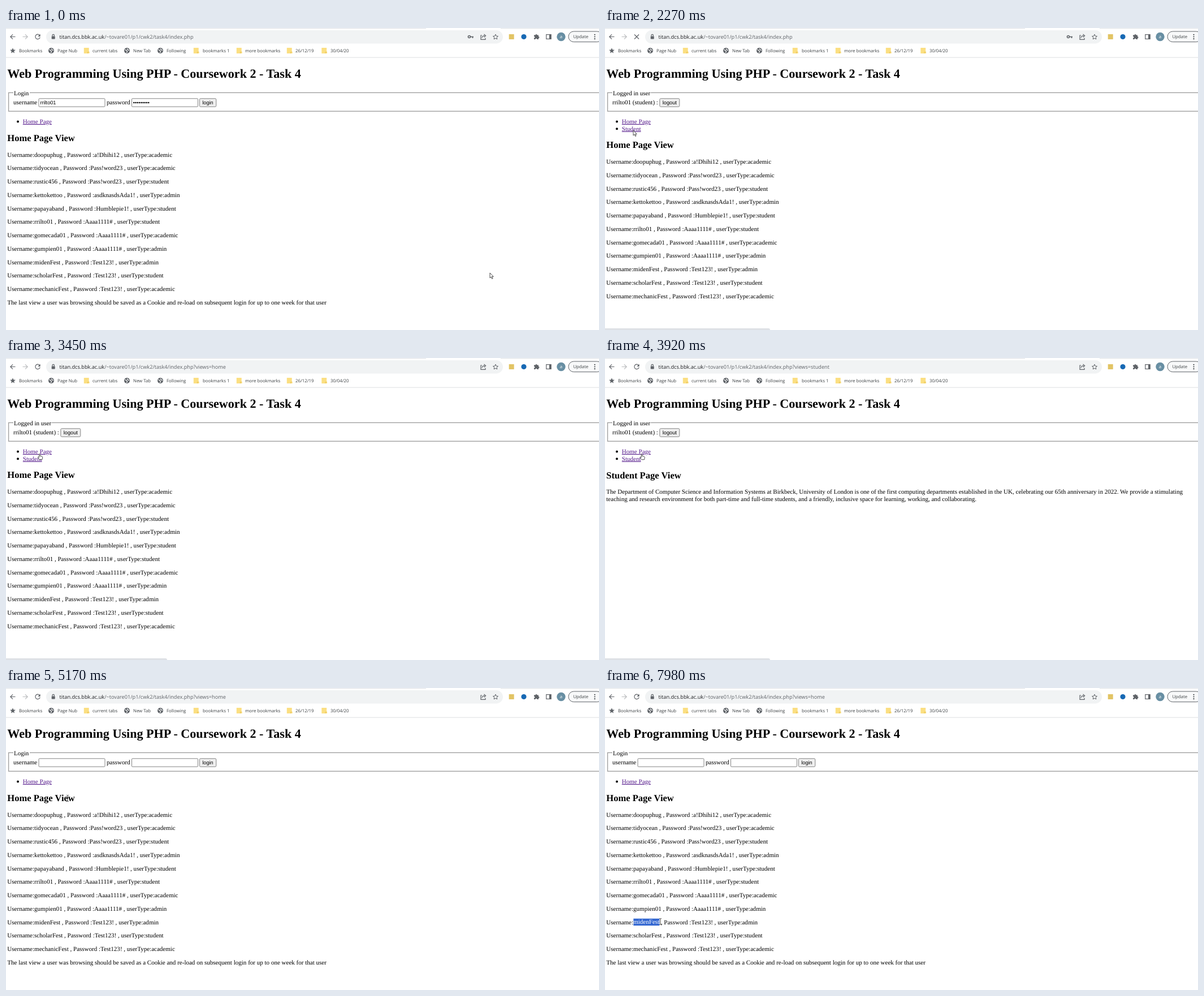
These frames come from a looping animation (1049 px wide and 534 px high, 8 s). An HTML page:

```html
<!DOCTYPE html>
<html lang="en">
<head>
<meta charset="utf-8">
<title>Login demo</title>
<style>
  html, body { margin: 0; width: 100%; height: 100%; overflow: hidden; background: #fff; }
  svg { display: block; }
  text { white-space: pre; text-rendering: geometricPrecision; }
  .page { font: 11.04px "Liberation Serif", serif; }
  .h1 { font-size: 22.1px; font-weight: bold; }
  .h2 { font-size: 16.56px; font-weight: bold; }
  .control { font: 9.2px "Liberation Sans", sans-serif; }
  .link { fill: #551a8b; text-decoration: underline; }
  .ui { font: 7.8px "Open Sans", sans-serif; fill: #3c4043; }
  .url { font-size: 9.19px; fill: #5f6368; }
  .field { fill: #fff; stroke: #767676; stroke-width: .9; }
  .button { fill: #efefef; stroke: #767676; stroke-width: .9; }
  .button.hover { fill: #e0e0e0; stroke: #4f4f4f; }
  .icon { fill: none; stroke: #5f6368; stroke-width: 1.2; }
</style>
</head>
<body>
<svg width="1049" height="534" viewBox="0 0 1049 534">
  <rect width="1049" height="534" fill="#fff"/>
  <g class="ui">
    <path d="M0 0H743V1H0ZM875 0H1049V1H875Z" fill="#dee1e6"/>
    <rect x="71" y="4" width="808" height="23.5" rx="11.7" fill="#f1f3f4"/>
    <rect y="51.6" width="1049" height="1" fill="#dcdfe2"/>
    <path class="icon" d="M16.5 15.5H8M12 11.3L7.8 15.5L12 19.7"/>
    <path class="icon" d="M29.5 15.5H38M34 11.3L38.2 15.5L34 19.7" style="stroke:#babcbe"/>
    <g id="reload">
      <path class="icon" d="M59.2 12.5A4.2 4.2 0 1 0 60.2 16.5"/>
      <path d="M60.6 10.7V15H56.3Z" fill="#5f6368"/>
    </g>
    <path id="stop" class="icon" d="M52 11.5L60 19.5M60 11.5L52 19.5"/>
    <rect x="80.7" y="14.4" width="6" height="5" rx=".6" fill="#5f6368"/>
    <path class="icon" d="M82 14.5V13A1.7 1.7 0 0 1 85.4 13V14.5" stroke-width="1"/>
    <text class="url" x="94.5" y="19.2"><tspan fill="#202124">titan.dcs.bbk.ac.uk</tspan>/~tovare01/p1/cwk2/task4/index.php<tspan id="query"></tspan></text>
    <g id="key" class="icon"><circle cx="819.5" cy="15.5" r="2" stroke-width="1.6"/><path d="M821.5 15.5H827M825.5 15.5V18" stroke-width="1.6"/></g>
    <path class="icon" d="M842 13H840V20.3H848V17.5M842 17.5Q842.5 13.7 847 13.7M845.5 11L848.7 13.7L845.5 16.4" stroke-width="1"/>
    <path class="icon" d="M866 11.2L867.3 14.2L870.5 14.5L868.1 16.7L868.8 19.8L866 18.2L863.2 19.8L863.9 16.7L861.5 14.5L864.7 14.2Z" style="stroke-width:1"/>
    <rect x="889.7" y="11" width="9" height="9" fill="#e2c465"/>
    <circle cx="916" cy="15.5" r="4.6" fill="#1769b4"/>
    <path fill="#5f6368" d="M934 12.5H936.6A1.5 1.5 0 0 1 939.6 12.5H942V15A1.5 1.5 0 0 1 942 18V20H939.5A1.5 1.5 0 0 0 936.5 20H934V17.8A1.5 1.5 0 0 0 934 14.8Z"/>
    <rect class="icon" x="955.8" y="11.6" width="8.4" height="7.8"/>
    <rect x="961" y="11.6" width="3.2" height="7.8" fill="#5f6368"/>
    <circle cx="982" cy="15.5" r="7.7" fill="#688fa3"/>
    <text x="982" y="18.2" text-anchor="middle" style="fill:#fff">a</text>
    <rect x="995" y="6" width="60" height="18.6" rx="9.3" fill="#f8f9fa" stroke="#5f6368"/>
    <text x="1003.4" y="18.2">Update</text>
    <g fill="#3c4043"><circle cx="1041.5" cy="11.8" r="1.1"/><circle cx="1041.5" cy="15.5" r="1.1"/><circle cx="1041.5" cy="19.2" r="1.1"/></g>
    <path fill="#5f6368" d="M12 35.2L13.4 38.4L16.9 38.7L14.2 41L15 44.4L12 42.6L9 44.4L9.8 41L7.1 38.7L10.6 38.4Z"/>
    <g id="bookmarks"></g>
  </g>

  <g class="page">
    <text class="h1" x="2.3" y="88">Web Programming Using PHP - Coursework 2 - Task 4</text>
    <rect x="4.6" y="114.4" width="1060" height="32.8" fill="none" stroke="#9a9a9a" stroke-width="1.3"/>
    <g id="loggedOut">
      <rect x="13" y="112" width="29" height="5" fill="#fff"/>
      <text x="14" y="118.5">Login</text>
      <text x="13" y="135.3">username</text>
      <text x="178" y="135.3">password</text>
      <rect class="field" x="58" y="124.8" width="117" height="14.4" rx="1.3"/>
      <rect class="field" x="222.5" y="124.8" width="117" height="14.4" rx="1.3"/>
      <g id="filled"><text class="control" x="60.4" y="135.2">rrilto01</text></g>
      <rect id="login" class="button" x="342.4" y="124.8" width="29.4" height="14.4" rx="1.8"/>
      <text class="control" x="357" y="135.2" text-anchor="middle">login</text>
    </g>
    <g id="loggedIn">
      <rect x="13" y="112" width="68" height="5" fill="#fff"/>
      <text x="14" y="118.5">Logged in user</text>
      <text x="13" y="135.3">rrilto01 (student) :</text>
      <rect id="logout" class="button" x="96.8" y="124.8" width="35" height="14.4" rx="1.8"/>
      <text class="control" x="114.3" y="135.2" text-anchor="middle">logout</text>
      <circle cx="21" cy="178.2" r="2"/>
      <text class="link" x="29.8" y="181.6">Student</text>
    </g>
    <circle cx="21" cy="165.5" r="2"/>
    <text class="link" x="29.8" y="168.9">Home Page</text>
    <g id="home"><text class="h2" x="2.3" y="199.8">Home Page View</text></g>
    <text id="hint" x="2.3" y="488.8">The last view a user was browsing should be saved as a Cookie and re-load on subsequent login for up to one week for that user</text>
    <g id="student">
      <text class="h2" x="2.3" y="212.5">Student Page View</text>
      <text x="2.3" y="240.3">The Department of Computer Science and Information Systems at Birkbeck, University of London is one of the first computing departments established in the UK, celebrating our 65th anniversary in 2022. We provide a stimulating</text>
      <text x="2.3" y="253">teaching and research environment for both part-time and full-time students, and a friendly, inclusive space for learning, working, and collaborating.</text>
    </g>
    <svg id="selection" x="50.2" y="407.5" width="0" height="12.7">
      <rect width="60" height="13" fill="#3367d1"/>
      <text y="9.9" fill="#fff">midenFest</text>
    </svg>
  </g>
  <path id="status" fill="#dee1e6"/>
  <g id="cursor" fill="#fff" stroke="#222" stroke-width=".8">
    <path id="arrow" d="M0 0V9L2.1 7.1L3.6 10.5L5.1 9.8L3.6 6.6H6.3Z"/>
    <path id="hand" d="M-.8 .8Q0 -.6 .9 .8V4L4.3 4.8Q5.6 5.2 5.2 7L4.5 10.3H-.2L-3 6.6Q-3 5.2 -1.9 5.6L-.8 6.5Z"/>
    <path id="beam" d="M-2 -5.5Q0 -5.5 0 -4.5Q0 -5.5 2 -5.5M0 -4.5V4.5M-2 5.5Q0 5.5 0 4.5Q0 5.5 2 5.5" fill="none"/>
  </g>
</svg>
<script>
const $ = id => document.getElementById(id);
const add = (id, markup) => $(id).insertAdjacentHTML('beforeend', markup);
const show = (id, on) => $(id).style.display = on ? '' : 'none';

const globe = x => `<circle cx="${x}" cy="40" r="5" fill="#5f6368"/>
  <path d="M${x - 3.6} 38.2L${x - .8} 39.7L${x + .6} 42L${x - 1} 44M${x + .5} 36.2L${x + 1} 38.4L${x + 3.8} 39.6" fill="none" stroke="#fff" stroke-width="1.2"/>`;
const folder = x => `<path d="M${x - 4.7} 35H${x + 4.2}V42.5H${x + 5}V45H${x - 4.7}Z" fill="#fbdf82"/>
  <path d="M${x + 2} 45V42.5H${x + 5}" fill="none" stroke="#e5bd4e" stroke-width=".8"/>`;

[['Bookmarks', 23], ['Page Nub', 91, globe, 80], ['current tabs', 153, folder, 142.5],
 ['New Tab', 225, globe, 214], ['Following', 284, globe, 273], ['bookmarks 1', 348, folder, 336.5],
 ['more bookmarks', 423, folder, 412.5], ['26/12/19', 512, folder, 501.5], ['30/04/20', 574, folder, 563]]
  .forEach(([label, x, icon, at]) =>
    add('bookmarks', `${icon ? icon(at) : ''}<text x="${x}" y="42.7">${label}</text>`));

['doopuphug a!Dhihi12 academic', 'tidyocean Pass!word23 academic', 'rustic456 Pass!word23 student',
 'kettokettoo asdknasdsAda1! admin', 'papayaband Humblepie1! student', 'rrilto01 Aaaa1111# student',
 'gomecada01 Aaaa1111# academic', 'gumpien01 Aaaa1111# admin', 'midenFest Test123! admin',
 'scholarFest Test123! student', 'mechanicFest Test123! academic']
  .forEach((row, i) => {
    const [user, password, type] = row.split(' ');
    add('home', `<text x="2.3" y="${227.5 + 23.75 * i}">Username:${user} , Password :${password} , userType:${type}</text>`);
  });

for (let i = 0; i < 9; i++) add('filled', `<circle cx="${226.3 + 3.24 * i}" cy="132" r="1.25"/>`);

const LOOP = 8000;
// Screen updates: first, last, count
const updates = [[70, 810, 11], [900, 1120, 4], [1290, 2040, 11], [2130, 2900, 11], [3130, 3920, 11],
  [4000, 4480, 7], [4620, 4620, 1], [4790, 5550, 11], [5640, 6410, 11], [6490, 7280, 11],
  [7350, 7350, 1], [7510, 7660, 3], [7980, 7980, 1]]
  .flatMap(([from, to, n]) => Array.from({length: n}, (_, i) => from + (to - from) * i / (n - 1 || 1)));

// Pointer path: time, x, y, shape
const path = [[0, 856, 433, 'arrow'], [60, 856, 433, 'arrow'], [350, 590, 270, 'arrow'], [585, 322, 131, 'beam'],
  [730, 334, 131, 'beam'], [800, 350, 130, 'arrow'], [900, 351, 130, 'arrow'], [1360, 351, 130, 'arrow'],
  [1700, 140, 165, 'arrow'], [2030, 50, 180, 'hand'], [2190, 50, 181, 'arrow'], [2430, 50, 181, 'hand'],
  [2740, 57, 166, 'hand'], [3360, 57, 166, 'hand'], [3570, 63, 174, 'hand'], [3800, 65, 170, 'hand'],
  [4000, 65, 169, 'hand'], [4080, 75, 160, 'arrow'], [4380, 112, 131, 'arrow'], [4480, 114, 130, 'arrow'],
  [4790, 114, 130, 'arrow'], [4940, 113, 144, 'arrow'], [5080, 110, 183, 'beam'], [5170, 109, 195, 'beam'],
  [5550, 113, 317, 'beam'], [6020, 105, 436, 'beam'], [6410, 54, 414, 'beam'], [6560, 46, 412, 'beam'],
  [6720, 50, 413, 'beam'], [7280, 92, 414, 'beam'], [7350, 96, 413, 'beam'], [7660, 100, 413, 'beam'],
  [7980, 98, 413, 'beam'], [LOOP, 98, 413, 'beam']];

// Page states: time, signed in, view, query
const pages = [[0, false, 'home', ''], [1364, true, 'home', ''], [2430, true, 'student', '?views=student'],
  [3350, true, 'home', '?views=home'], [3760, true, 'student', '?views=student'], [4860, false, 'home', '?views=home']];
const loading = [[1040, 1364], [2200, 2430], [3200, 3350], [3600, 3760], [4620, 4860]];
const statusWidths = [[0, 0], [2130, 292], [2660, 285], [3500, 292], [4070, 0]];

const latest = (list, t) => list.findLast(item => item[0] <= t);

function render(t) {
  t = updates.findLast(u => u <= t) ?? 0;

  const [, signedIn, view, query] = latest(pages, t);
  show('loggedIn', signedIn);
  show('loggedOut', !signedIn);
  show('filled', t < 1364);
  show('home', view === 'home');
  show('student', view === 'student');
  show('hint', !signedIn);
  show('key', !query);
  $('query').textContent = query;
  $('home').setAttribute('transform', `translate(0 ${signedIn ? 12.7 : 0})`);

  const busy = loading.some(([from, to]) => t >= from && t < to);
  show('stop', busy);
  show('reload', !busy);

  const width = latest(statusWidths, t)[1];
  $('status').setAttribute('d', width ? `M0 531H${width - 3}Q${width} 531 ${width} 534H0Z` : '');

  const i = path.findLastIndex(p => p[0] <= t);
  const [t0, x0, y0, shape] = path[i];
  const [t1, x1, y1] = path[i + 1];
  const k = (t - t0) / (t1 - t0);
  const x = x0 + (x1 - x0) * k, y = y0 + (y1 - y0) * k;
  $('cursor').setAttribute('transform', `translate(${x} ${y})`);
  for (const id of ['arrow', 'hand', 'beam']) show(id, id === shape);

  const over = (left, right) => x > left && x < right && y > 124 && y < 140;
  $('login').classList.toggle('hover', over(342, 372));
  $('logout').classList.toggle('hover', over(97, 132));
  $('selection').setAttribute('width', t > 6720 ? Math.min(46, Math.max(0, x - 50.2)) : 0);
}

function frame(now) {
  render(now % LOOP);
  requestAnimationFrame(frame);
}
requestAnimationFrame(frame);
</script>
</body>
</html>
```
